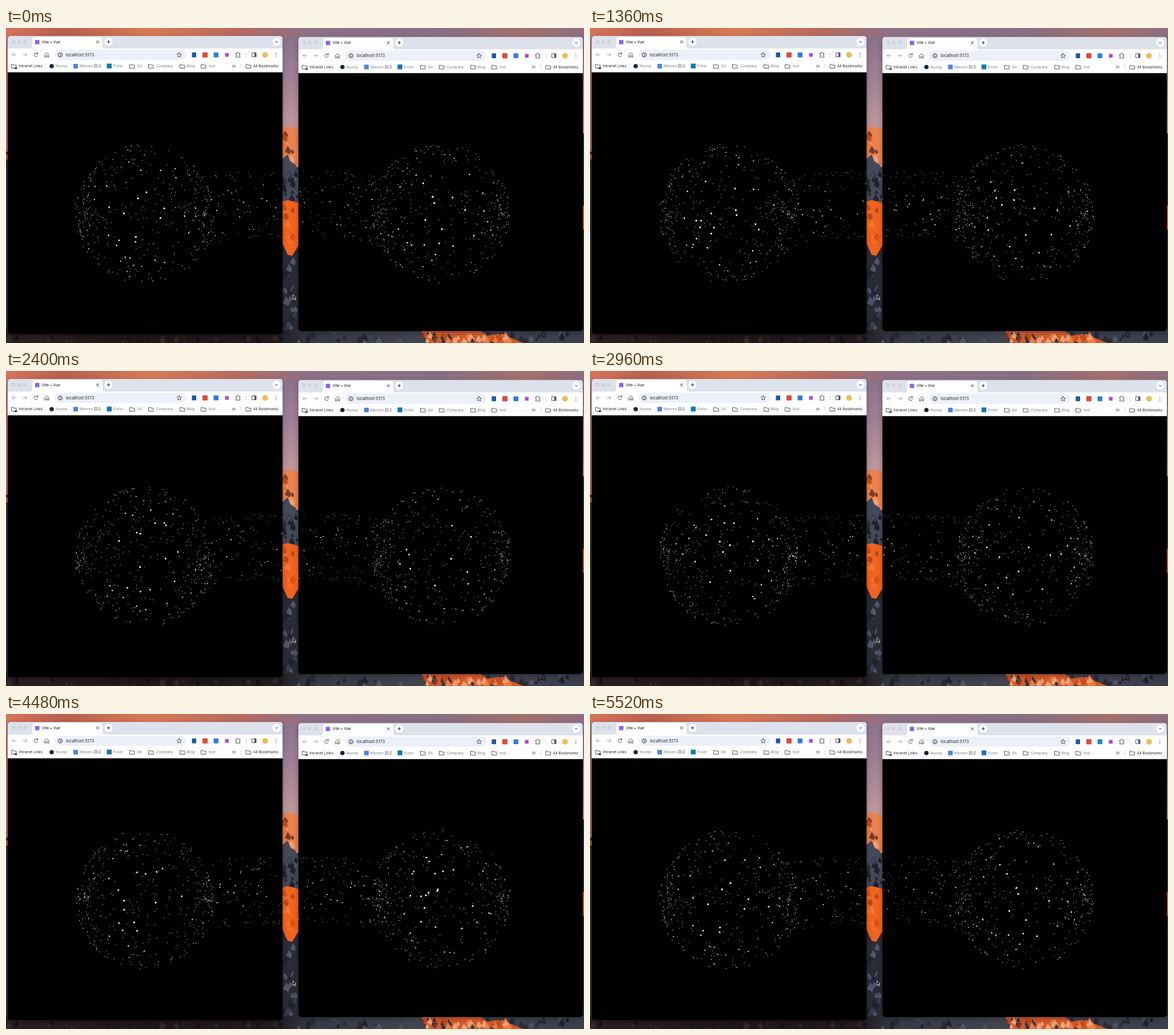
Animation of 1012 by 553 pixels, one loop 5.56 s. Source, as an HTML page with a canvas:

```html
<!DOCTYPE html>
<html lang="en">
<head>
<meta charset="utf-8">
<title>Linked particle spheres</title>
<style>
  html, body { margin: 0; width: 100%; height: 100%; overflow: hidden; background: #1d171b; }
  svg, canvas { position: absolute; left: 0; top: 0; width: 1012px; height: 553px; }
  text { font: 6.5px Inter, "Noto Sans CJK SC", "Noto Sans CJK", sans-serif; fill: #25272b; }
  .dim { fill: #7b7e84; }
  .url { font-size: 7.35px; }
  .tab { font-size: 6.4px; font-weight: 500; }
  .line { fill: none; stroke: #50545a; stroke-width: 1; stroke-linecap: round; stroke-linejoin: round; }
  .pale { stroke: #9b9ea6; }
  .dark { stroke: #25272b; }
</style>
</head>
<body>
<svg id="stage" viewBox="0 0 1012 553"></svg>
<canvas id="dots" width="1012" height="553"></canvas>
<script>
const W = 1012, H = 553, LOOP = 5560, STEP = 40, TAU = Math.PI * 2;

function seeded(s) {
  return () => {
    s = (s + 0x6D2B79F5) | 0;
    let n = Math.imul(s ^ (s >>> 15), 1 | s);
    n = (n + Math.imul(n ^ (n >>> 7), 61 | n)) ^ n;
    return ((n ^ (n >>> 14)) >>> 0) / 4294967296;
  };
}

// ---- static picture ----
const rect = (x, y, w, h, fill, r = 0) =>
  `<rect x="${x}" y="${y}" width="${w}" height="${h}" rx="${r}" fill="${fill}"/>`;
const disc = (x, y, r, fill) => `<circle cx="${x}" cy="${y}" r="${r}" fill="${fill}"/>`;
const line = (d, cls = '') => `<path class="line ${cls}" d="${d}"/>`;
const shape = (d, fill) => `<path d="${d}" fill="${fill}"/>`;
const label = (x, y, s, cls = '') => `<text x="${x}" y="${y}" class="${cls}">${s}</text>`;
const folder = x => line(`M${x - 4} 64h3l1 1.2h4v5.3h-8z`);
const gradient = (id, dir, stops) => `<linearGradient id="${id}" ${dir}>` +
  stops.map(([o, c]) => `<stop offset="${o}" stop-color="${c}"/>`).join('') + '</linearGradient>';

function crags(n, x, y, w, h, colors, rnd) {
  let s = '';
  for (let i = 0; i < n; i++) {
    const px = x + rnd() * w, py = y + rnd() * h, k = 3 + rnd() * 7;
    s += shape(`M${px} ${py}l${k * .7} ${k}l${-k * .3} ${k * .8}l${-k} ${-k * .5}z`,
      colors[Math.floor(rnd() * colors.length)]);
  }
  return s;
}

function wallpaper() {
  const rnd = seeded(12);
  const orange = ['#f0a075', '#c44e20', '#7c3a2a', '#ef7a3f'];
  const slate = ['#3a3f50', '#20222c', '#515566', '#2b2a33'];
  return '<defs>' +
    gradient('sky', 'x2="0" y2="1"', [[0, '#86708a'], [.45, '#9d8095'], [1, '#c39a9c']]) +
    gradient('top', '', [[0, '#d9735c'], [.1, '#b8604f'], [.25, '#d97a55'], [.4, '#b86a60'],
      [.52, '#8d7187'], [.75, '#866f84'], [.9, '#a3706c'], [1, '#8c6f80']]) +
    gradient('floor', '', [[0, '#2d2023'], [.2, '#201619'], [.47, '#1f1b20'], [.52, '#343743'],
      [.7, '#41434f'], [1, '#3b3e4c']]) + '</defs>' +
    rect(0, 0, W, 185, 'url(#sky)') + rect(0, 0, W, 17, 'url(#top)') +
    rect(0, 14, 4, 205, '#ad7580') + rect(0, 217, 4, 336, '#30313c') + rect(0, 222, 4, 9, '#c25d3b') +
    rect(480, 185, 34, 368, '#343847') +
    shape('M482 170l8 5 8-2 14 5v66l-9 1-7-6-14 9z', '#e9824f') +
    crags(13, 484, 180, 28, 52, orange, rnd) +
    shape('M484 230l9-8 5 12 9 6 5 14v52h-28z', '#454a5b') +
    crags(18, 484, 246, 28, 48, slate, rnd) +
    shape('M482 305l12-3 18 5v85l-10 10-20-3z', '#f1641f') +
    crags(9, 485, 308, 25, 74, ['#f47b35', '#d94f16', '#fa7129', '#b9471d'], rnd) +
    shape('M484 378l9 20 8 2 11-18v171h-28z', '#292b35') +
    crags(26, 484, 402, 28, 140, slate, rnd) +
    rect(1008, 185, 4, 368, '#303440') + rect(1008, 312, 4, 42, '#df6228') +
    rect(0, 530, W, 23, 'url(#floor)') +
    crags(40, 0, 536, 490, 14, ['#171114', '#35282a', '#281b1d'], rnd) +
    crags(55, 505, 530, 500, 18, slate, rnd) +
    shape('M727 532h104l12 8 18-3 22 7 23 9H741l-8-9z', '#d15a2b') +
    crags(40, 728, 532, 155, 14, [...orange, '#343642'], rnd);
}

// far: shift of the right-aligned controls
function browser(x, y, w, h, far) {
  const left = [
    [disc(13, 24, 3.2, '#cfd3dc'), disc(23, 24, 3.2, '#cfd3dc'), disc(33.5, 24, 3.2, '#cfd3dc')].join(''),
    shape('M42 36q4 0 4-4V21q0-5 5-5h113q5 0 5 5v11q0 4 4 4z', '#fff'),
    rect(51, 21, 7.5, 7.5, '#8a62f0'), label(63, 26.6, 'Vite + Vue', 'tab'),
    line('M158.4 22.4l4 4m0-4l-4 4', 'dark'),
    disc(179.5, 24.3, 7.2, '#fafbff'), line('M177 24.3h5m-2.5-2.5v5', 'dark'),
    line('M17.5 47h-6.5m3-3l-3 3 3 3M30 47h6.500m-3-3l3 3-3 3', 'pale'),
    line('M55 45a3.3 3.3 0 1 0 .4 3.200M55.500 43v2.500h-2.500'),
    line('M68 46.500l3.500-3 3.500 3v4.500h-2.300v-2.700h-2.400v2.700h-2.300z'),
    rect(85, 38, 231 + far - x, 18, '#edf0f8', 9),
    `<circle class="line dark" cx="95" cy="47.200" r="3.600"/>`, line('M95 47v2M95 45.300v.1', 'dark'),
    label(105, 49.8, 'localhost:5173', 'url'),
    folder(14), line('M16 69.500h3v2h-3z', 'dark'), label(22.5, 69.2, 'Intranet Links'),
    disc(80, 67, 3.8, '#17253d'), label(87, 69.2, 'Nuvop', 'dim'),
    rect(118, 63, 8, 8, '#4c82e8'), label(129, 69.2, 'Mavoro 翻译', 'dim'),
    rect(176.5, 62.5, 8.5, 8.5, '#137ab4', 1), label(188, 69.2, 'Fivlor', 'dim'),
    ...[[221, 'Git', 8.500], [254, 'Company', 9], [309, 'Blog', 7.500], [346, 'tool', 9]]
      .map(([fx, s, d]) => folder(fx) + label(fx + d, 69.2, s, 'dim'))
  ].join('');
  const right = [
    disc(473.5, 24.3, 7.2, '#fafbff'), line('M471.500 23.500l2 2 2-2', 'dark'),
    line('M303.300 43l1.200 2.700 3 .3-2.300 2 .7 3-2.600-1.600-2.600 1.600.7-3-2.300-2 3-.3z'),
    rect(325.5, 43, 7.5, 8.5, '#1c58ad'), rect(344, 42.8, 9, 9, '#dc4a3f', 1),
    rect(363.5, 43, 8.5, 8.5, '#2e7ce0', 1), rect(383.5, 44, 6.5, 6.5, '#b44bd0'),
    line('M402.500 44.500h2.200q0-2 1.400-2t1.400 2h2.300v2.300q-1.800 0-1.800 1.200t1.800 1.200v2h-7.300v-2q1.700 0 1.700-1.200t-1.700-1.200z'),
    rect(420, 43, .8, 8.5, '#c6cbd8'),
    line('M431 43.500h7v7h-7z'), rect(435, 43.5, 3, 7, '#50545a'),
    disc(453.7, 47.3, 5, '#eebd58'),
    [44.2, 47.2, 50.2].map(v => disc(472.8, v, .8, '#50545a')).join(''),
    line('M396.500 65l2 2-2 2m3-4l2 2-2 2', 'dark'),
    rect(411, 62.5, .8, 8.5, '#c6cbd8'), folder(424.5), label(433, 69.2, 'All Bookmarks')
  ].join('');
  const id = 'w' + x;
  return `<clipPath id="${id}"><rect x="3" y="14" width="${w}" height="${h}" rx="5"/></clipPath>
    <g transform="translate(${x} ${y})" style="filter:drop-shadow(0 3px 4px rgba(0,0,0,.3))">
    <g clip-path="url(#${id})">${rect(3, 14, w, 23, '#dce1eb')}${rect(3, 36, w, 42, '#fff')}
    ${rect(3, 77.8, w, h, '#000')}${left}<g transform="translate(${far - x})">${right}</g></g></g>`;
}

document.getElementById('stage').innerHTML = wallpaper() +
  browser(0, 0, 481.5, 523.5, 0) + browser(509, 1.5, 498, 516.5, 525) +
  `<path d="M502.500 468v8.300l1.900-1.700 1.300 3 1.300-.6-1.300-2.900h2.400z"
    fill="#111" stroke="#eee" stroke-width=".8"/>`;

// ---- particles: sphere plus tunnel, both turning about the x axis ----
const R = 106, CAM = 226, DOT = .86;

function particles(seed, tunnelCount) {
  const rnd = seeded(seed), list = [];
  for (let i = 0; i < 430; i++) {
    const polar = rnd() * Math.PI, r = R - 2 + rnd() * 4;
    list.push({ x: r * Math.cos(polar), r: r * Math.sin(polar), a: rnd() * TAU,
      nx: Math.cos(polar), nr: Math.sin(polar), lift: 0 });
  }
  for (let i = 0; i < tunnelCount; i++) {
    const x = 75 + rnd() * 235, u = Math.min(1, (x - 75) / 90);
    list.push({ x, r: 54 + 10 * Math.exp((75 - x) / 25) + rnd() * 3, a: rnd() * TAU,
      nx: 0, nr: 1, lift: 16 * u * u * (3 - 2 * u) });
  }
  return list;
}

const views = [
  { cx: 243, cy: 326, side: 1, box: [3, 78, 481, 459], list: particles(7, 165) },
  { cx: 762, cy: 325, side: -1, box: [512, 80, 498, 452], list: particles(31, 165) }
];
const ctx = document.getElementById('dots').getContext('2d');

function drawView({ cx, cy, side, box, list }, turn) {
  ctx.save();
  ctx.beginPath();
  ctx.rect(...box);
  ctx.clip();
  ctx.fillStyle = '#fff';
  for (const p of list) {
    const c = Math.cos(p.a + turn), s = Math.sin(p.a + turn);
    const x = p.x * side, y = p.r * c, z = p.r * s, k = CAM / (CAM - z);
    const nx = p.nx * side, ny = p.nr * c, nz = p.nr * s;
    const facing = Math.abs(nz * (CAM - z) - nx * x - ny * y) / Math.hypot(x, y, CAM - z);
    const r = DOT * k;
    ctx.beginPath();
    ctx.ellipse(cx + x * k, cy - p.lift + y * k, r * Math.max(.35, facing), r,
      Math.atan2(ny, nx), 0, TAU);
    ctx.fill();
  }
  ctx.restore();
}

function frame(now) {
  const t = Math.floor((now % LOOP) / STEP) * STEP;
  ctx.clearRect(0, 0, W, H);
  for (const v of views) drawView(v, TAU * t / LOOP);
  requestAnimationFrame(frame);
}
frame(performance.now());
</script>
</body>
</html>
```
